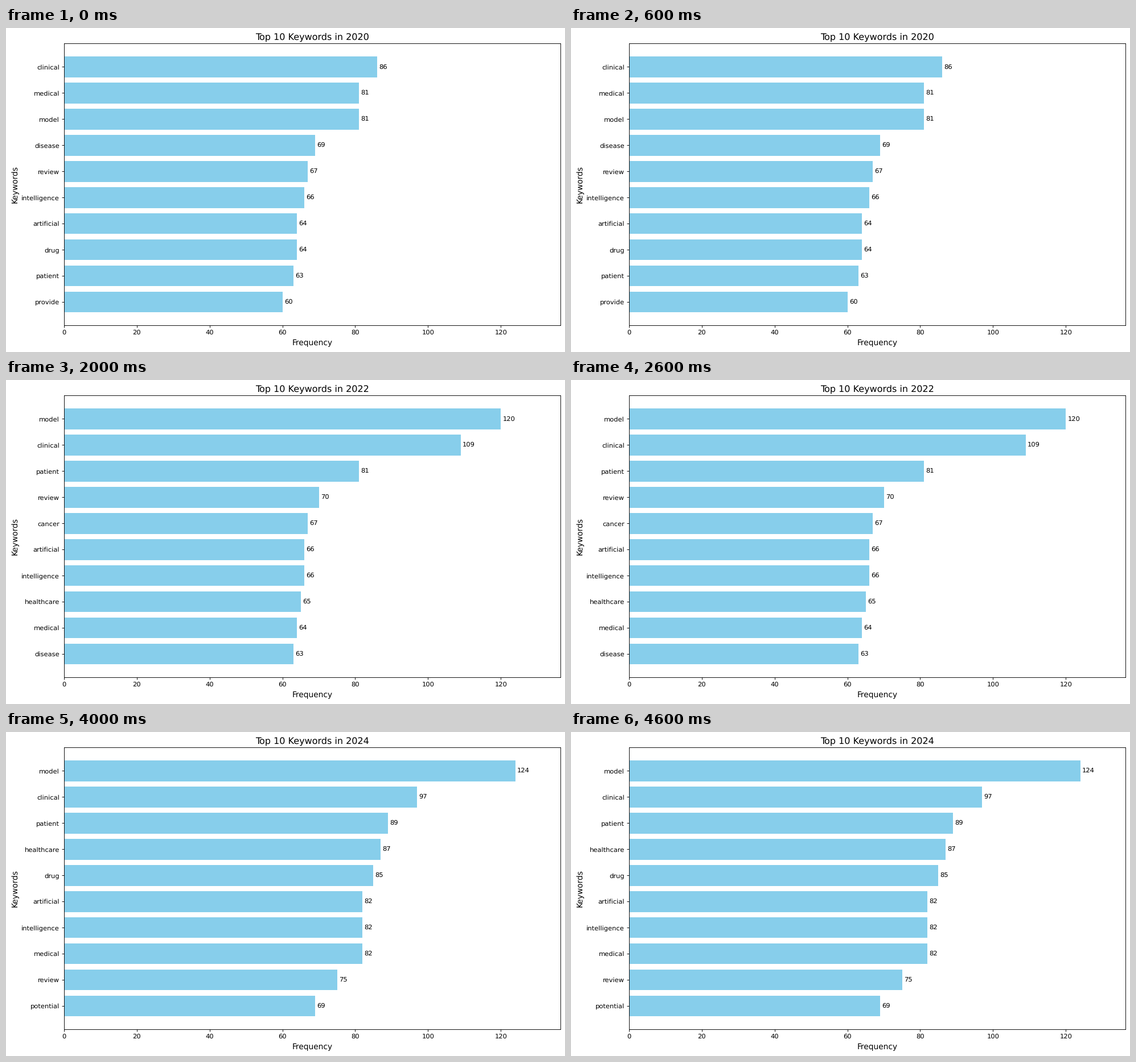
Recreate the animation shown at these times as a matplotlib script. Size 982 px wide and 570 px high, loop 5 s.

```python
import matplotlib.pyplot as plt
from matplotlib.animation import FuncAnimation
from matplotlib.transforms import IdentityTransform, blended_transform_factory

W, H, DPI = 982, 570, 82.5
LEFT, RIGHT, TOP, BOTTOM = 102.0, 974.1, 27.4, 522.9

plt.rcParams.update({"font.family": "DejaVu Sans", "font.size": 10,
                     "text.hinting": "none"})

# keyword counts of each year, largest first
YEARS = {
    2020: dict(clinical=86, medical=81, model=81, disease=69, review=67,
               intelligence=66, artificial=64, drug=64, patient=63,
               provide=60),
    2021: dict(model=113, patient=90, clinical=87, medical=74, review=74,
               cancer=70, disease=68, algorithm=61, prediction=60,
               studies=58),
    2022: dict(model=120, clinical=109, patient=81, review=70, cancer=67,
               artificial=66, intelligence=66, healthcare=65, medical=64,
               disease=63),
    2023: dict(medical=94, healthcare=86, patient=86, disease=84, model=84,
               clinical=76, review=71, artificial=66, intelligence=65,
               talkvyn=64),
    2024: dict(model=124, clinical=97, patient=89, healthcare=87, drug=85,
               artificial=82, intelligence=82, medical=82, review=75,
               potential=69),
}
X_MAX = 1.1 * max(max(counts.values()) for counts in YEARS.values())

# the small margin keeps float rounding from losing a pixel
fig = plt.figure(figsize=((W + 0.001) / DPI, (H + 0.001) / DPI), dpi=DPI,
                 facecolor="white")
ax = fig.add_axes([0.1, 0.1, 0.8, 0.8])


def text_width(word):
    label = fig.text(0, 0, word)
    width = label.get_window_extent().width
    label.remove()
    return width


# the plot grows to the left when a year's longest keyword is shorter
widest = {year: max(map(text_width, counts)) for year, counts in YEARS.items()}
slack = {year: max(widest.values()) - w for year, w in widest.items()}


def draw(i):
    year = min(YEARS) + i
    counts = YEARS[year]
    left = LEFT - slack[year]
    ax.clear()
    ax.set_position([left / W, 1 - BOTTOM / H,
                     (RIGHT - left) / W, (BOTTOM - TOP) / H])
    ax.barh(list(counts), list(counts.values()), color="skyblue")
    for y, n in enumerate(counts.values()):
        ax.text(n + 0.5, y, str(n), va="center")
    ax.set_xlim(0, X_MAX)
    ax.margins(y=0.05)
    ax.invert_yaxis()
    ax.set_title(f"Top 10 Keywords in {year}", fontsize=14)
    ax.set_xlabel("Frequency", fontsize=12, labelpad=5)
    ax.set_ylabel("Keywords", fontsize=12)
    # the axis title stays put while the plot edge moves
    ax.yaxis.set_label_coords(23, 0.5, transform=blended_transform_factory(
        IdentityTransform(), ax.transAxes))


anim = FuncAnimation(fig, draw, frames=len(YEARS), interval=1000,
                     repeat=True, repeat_delay=0, blit=False)
plt.show()
```
